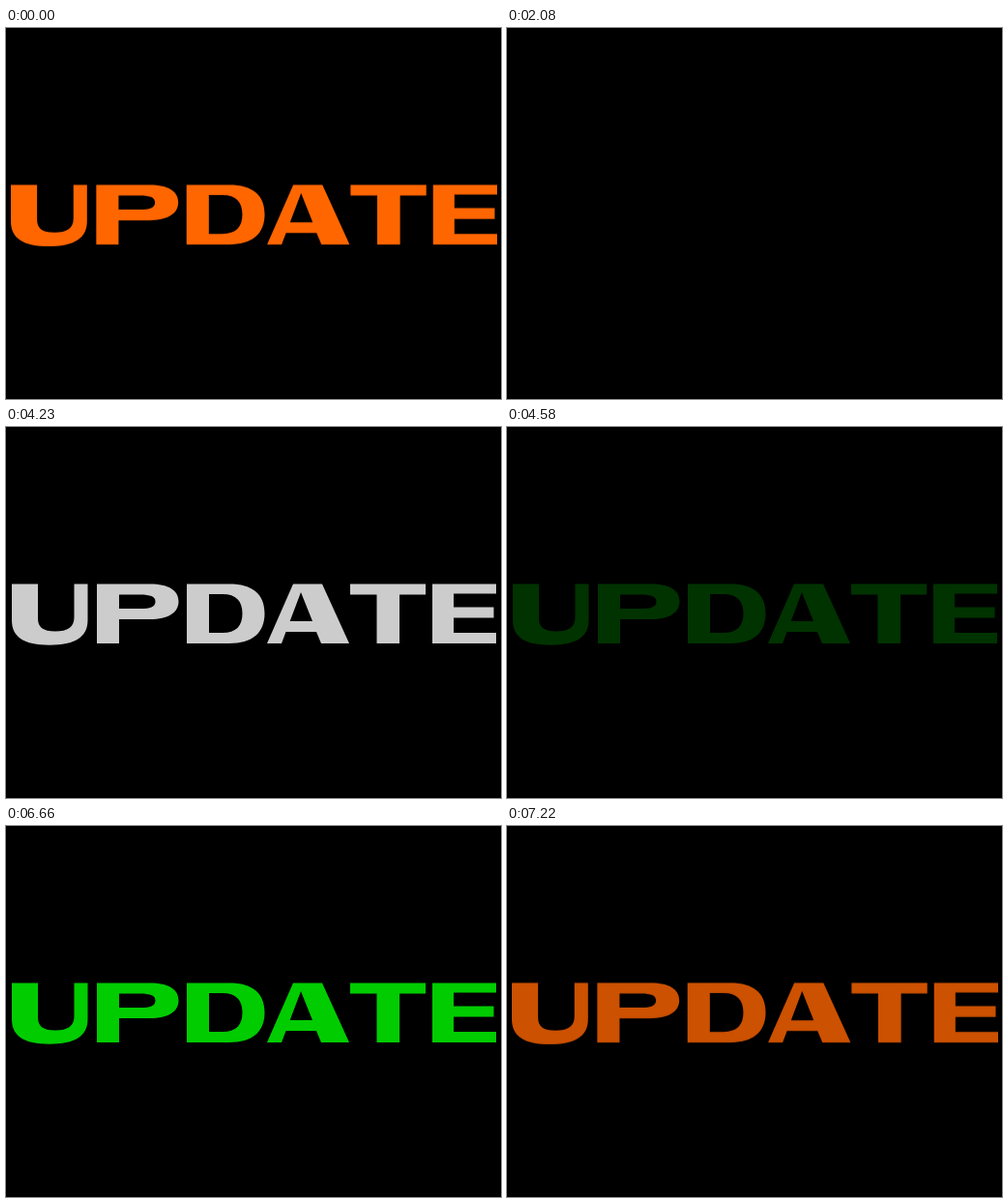
These frames come from a looping animation (512 px wide and 384 px high, 7.29 s). An HTML page without scripts:

```html
<!DOCTYPE html>
<html lang="en">
<head>
<meta charset="utf-8">
<title>Update</title>
<style>
  html, body { margin: 0; width: 100%; height: 100%; overflow: hidden; background: #000; }
  svg { display: block; width: 512px; height: 384px; }

  .word {
    fill-rule: evenodd;
    transform-origin: 256px 194px;
    animation: hue 7290ms step-end infinite, fade 7290ms infinite;
  }

  /* The colour swaps while the word is black; orange is slightly wider. */
  @keyframes hue {
    0%      { fill: #f60; transform: scale(1.004); }
    29.492% { fill: #fff; transform: none; }
    62.825% { fill: #0f0; transform: none; }
    96.159%, 100% { fill: #f60; transform: scale(1.004); }
  }

  /* Each fade moves by a fifth every 70 ms. */
  @keyframes fade {
    0%      { opacity: 1; animation-timing-function: step-end; }
    24.691% { opacity: 1; animation-timing-function: steps(5, jump-start); }
    29.492% { opacity: 0; animation-timing-function: steps(5, jump-start); }
    34.293% { opacity: 1; animation-timing-function: step-end; }
    58.024% { opacity: 1; animation-timing-function: steps(5, jump-start); }
    62.825% { opacity: 0; animation-timing-function: steps(5, jump-start); }
    67.626% { opacity: 1; animation-timing-function: step-end; }
    91.358% { opacity: 1; animation-timing-function: steps(5, jump-start); }
    96.159% { opacity: 0; animation-timing-function: steps(4, jump-start); }
    100%    { opacity: .8; }
  }
</style>
</head>
<body>
<svg viewBox="0 0 512 384" role="img" aria-label="UPDATE">
  <g class="word">
    <path d="M6 162.5H33V198C33 207 38 211.5 51 211.5S70.5 207 70.5 197V162.5H84.5V200C84.5 217 72 225.7 45 225.7S6 217 6 200Z"/>
    <path d="M94 224V162.5H149C168 162.5 178.5 169 178.5 180.5S168 199 149 199H117V224ZM117 173.5V188H139C149 188 154.5 186 154.5 180.7S149 173.5 139 173.5Z"/>
    <path d="M187 224V162.5H231C255 162.5 267.5 173 267.5 193S255 224 231 224ZM210 173V213H224C238 213 244.5 206 244.5 193S238 173 224 173Z"/>
    <path d="M270 224L297 162.5H327L355 224H326L321 212H289.5L285 224ZM305 171L293.7 201H317Z"/>
    <path d="M356 162.5H434V173.5H407V224H383.5V173.5H356Z"/>
    <path d="M441 162.5H507V172.5H463V186.5H504.5V197.5H463V213H507V224H441Z"/>
  </g>
</svg>
</body>
</html>
```
